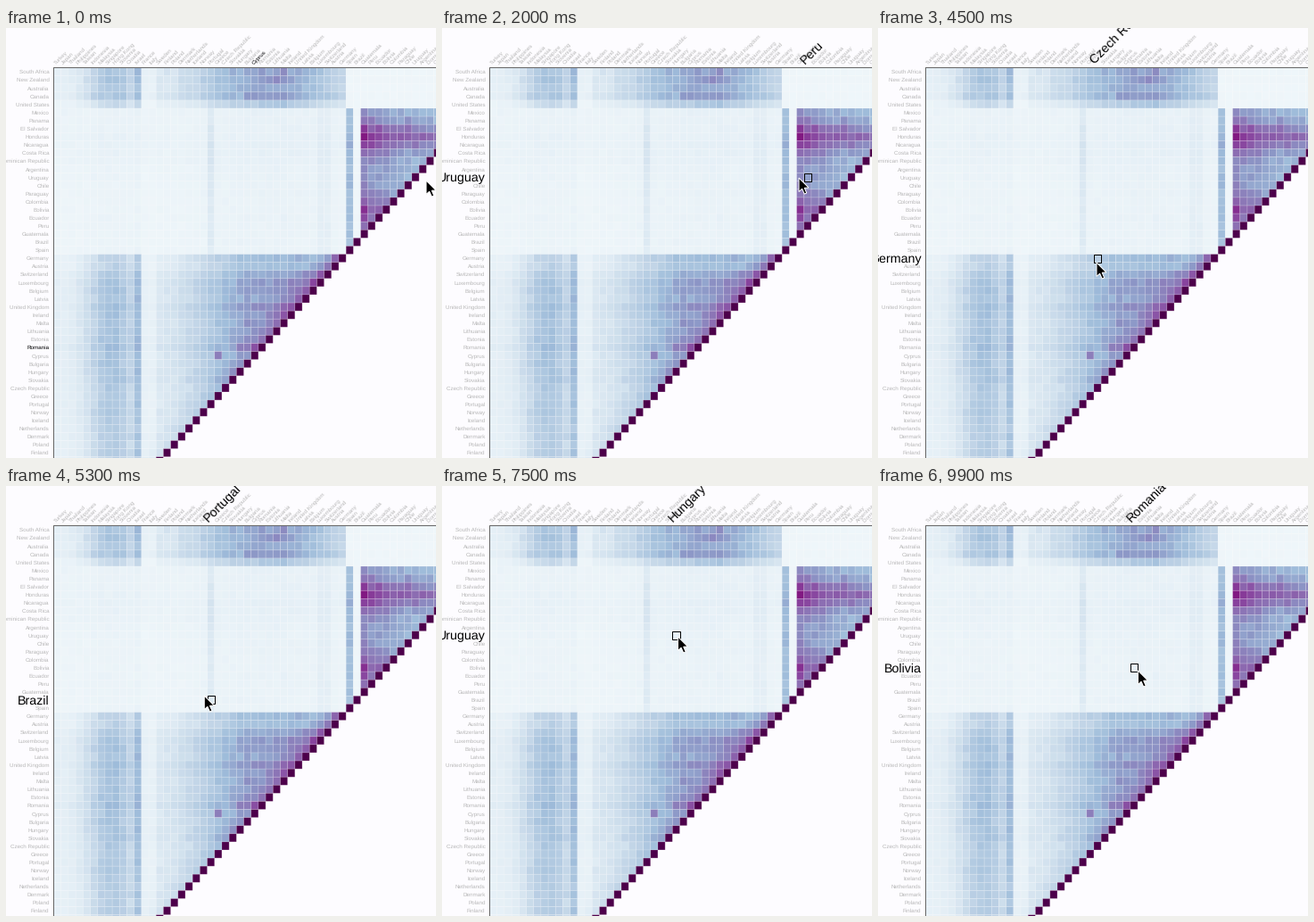
Recreate the animation shown at these times as a matplotlib script. Size 482x482 px, loop 10000 ms.

```python
import numpy as np
import matplotlib.pyplot as plt
from matplotlib.animation import FuncAnimation
from matplotlib.patches import Polygon, Rectangle

plt.rcParams["text.hinting"] = "none"

SIZE, DPI, PX = 482, 100, 0.72
LEFT, TOP, CW, RH = 53.6, 44.6, 8.19, 9.085
N, ROWS, COLS = 63, 49, 53
BG = "#fdfcff"
SMALL, BIG = 6.3, 14.2

NAMES = """South Africa,New Zealand,Australia,Canada,United States,Mexico,Panama,
El Salvador,Honduras,Nicaragua,Costa Rica,Dominican Republic,Argentina,Uruguay,
Chile,Paraguay,Colombia,Bolivia,Ecuador,Peru,Guatemala,Brazil,Spain,Germany,
Austria,Switzerland,Luxembourg,Belgium,Latvia,United Kingdom,Ireland,Malta,
Lithuania,Estonia,Romania,Cyprus,Bulgaria,Hungary,Slovakia,Czech Republic,Greece,
Portugal,Norway,Iceland,Netherlands,Denmark,Poland,Finland,Sweden,Italy,France,
Israel,Croatia,Slovenia,Hong Kong,Singapore,Malaysia,Indonesia,Taiwan,Philippines,
Thailand,Japan,Turkey""".replace("\n", "").split(",")


def bump(x, center, width):
    return np.exp(-((x - center) / width) ** 2)


def build_matrix():
    """Similarity (0 to 1): one column profile scaled by blocks of related rows."""
    rng = np.random.default_rng(4)
    r, k = np.indices((ROWS, COLS))
    gap = N - 1 - r - k  # steps to the diagonal

    profile = .1 + .23 * bump(k, 7.5, 3.5) + .37 * bump(k, 29, 10)
    profile[:, 11] = .36
    profile[:, 12:14] = .09
    profile[:, 31] += .06

    english = profile * np.where(r == 4, .68, 1)
    pale = .05 + .06 * profile + .018 * bump(r, 7.5, 3) + .07 * bump(k, 21, .5) + .05 * bump(k, 36.5, .8)
    latin = ((.5 + .35 * bump(r, 7.7, 1.8) + .25 * bump(r, 17, 2))
             * (.68 + .32 * np.exp(-(k - 42).clip(0) / 4.5)))
    europe = (profile.clip(max=.44) * np.interp(r, [23, 26, 35, 48], [.72, 1, 1.08, .82])
              + np.interp(r, [23, 30, 36], [.38, .2, .06]) * np.exp((1 - gap) / 2))

    m = np.select([(k < 40) & (r < 5), (k < 40) & (r < 23), k < 40, (k > 41) & (r > 4)],
                  [english, pale, europe, latin], .05)
    m[5:22, 40] = .36
    m *= 1 + .05 * rng.standard_normal(m.shape)
    m *= 1 + .04 * rng.standard_normal((ROWS, 1))
    m[35, 22] = .57
    m[gap == 0] = 1
    return np.ma.masked_where(gap < 0, m)


fig = plt.figure(figsize=(SIZE / DPI, SIZE / DPI), dpi=DPI, facecolor=BG)
ax = fig.add_axes([0, 0, 1, 1])
ax.set(xlim=(0, SIZE), ylim=(SIZE, 0))
ax.axis("off")

ax.pcolormesh(LEFT + CW * np.arange(COLS + 1), TOP + RH * np.arange(ROWS + 1),
              build_matrix(), cmap="BuPu", vmin=0, vmax=1, edgecolors=(1, 1, 1, .2),
              linewidth=.8 * PX, antialiased=True, snap=False)
ax.plot([53.5, 53.5, SIZE], [SIZE, 44.5, 44.5], color="#666666", lw=PX, snap=False)


def label(name, **kw):
    return ax.text(0, 0, name, family="Liberation Sans", va="baseline",
                   rotation_mode="anchor", clip_on=True, **kw)


row_labels = [label(n, ha="right") for n in NAMES[:ROWS]]
col_labels = [label(n, ha="left", rotation=45) for n in NAMES[::-1][:COLS]]


def style(text, size, active):
    text.set_fontsize(size * PX)
    text.set_color("black" if active else "#b8b8b8")
    text.set_zorder(5 if active else 3)


def style_labels(row, col, size):
    for i, t in enumerate(row_labels):
        s = size if i == row else SMALL
        t.set_position((48.5, TOP + RH * (i + .5) + .34 * s))
        style(t, s, i == row)
    for i, t in enumerate(col_labels):
        s = size if i == col else SMALL
        t.set_position((LEFT + CW * (i + .5) - .24 * s, 41))
        style(t, s, i == col)


box = ax.add_patch(Rectangle((0, 0), CW, RH, fc="none", ec="black", lw=PX, zorder=6))
ARROW = np.array([(0, 0), (0, 15.5), (3.6, 12.2), (6.2, 18), (8.7, 16.9),
                  (6.2, 11.2), (11, 11)])
cursor = ax.add_patch(Polygon(ARROW, fc="black", ec="white", lw=PX, zorder=8))

# Pointer path: seconds, x, y
PATH = np.array([(0, 471, 171), (.9, 457, 159), (1, 450, 156), (3.1, 342, 182),
                 (4.5, 245, 263), (6.3, 190, 195.5), (7.5, 264.5, 169), (9.9, 291.5, 207)])


def pointer(t):
    i = int(np.clip(np.searchsorted(PATH[:, 0], t, "right") - 1, 0, len(PATH) - 2))
    a, b = PATH[i], PATH[i + 1]
    u = np.clip((t - a[0]) / (b[0] - a[0]), 0, 1)
    return a[1:] + (b[1:] - a[1:]) * (1 - np.cos(np.pi * u)) / 2


def update(frame):
    t = frame / 10
    cursor.set_xy(ARROW + pointer(t))
    # The highlight trails the pointer slightly
    x, y = pointer(max(t - .1, 0)) - (1, 2)
    col, row = int((x - LEFT) // CW), int((y - TOP) // RH)
    inside = row + col < N - 1
    box.set_visible(inside)
    if inside:
        box.set_xy((LEFT + CW * col, TOP + RH * row))
        style_labels(row, col, BIG)
    else:
        style_labels(NAMES.index("Romania"), N - 1 - NAMES.index("Cyprus"), SMALL)
    return [cursor, box, *row_labels, *col_labels]


anim = FuncAnimation(fig, update, frames=100, interval=100, repeat=True, repeat_delay=0)
plt.show()
```
